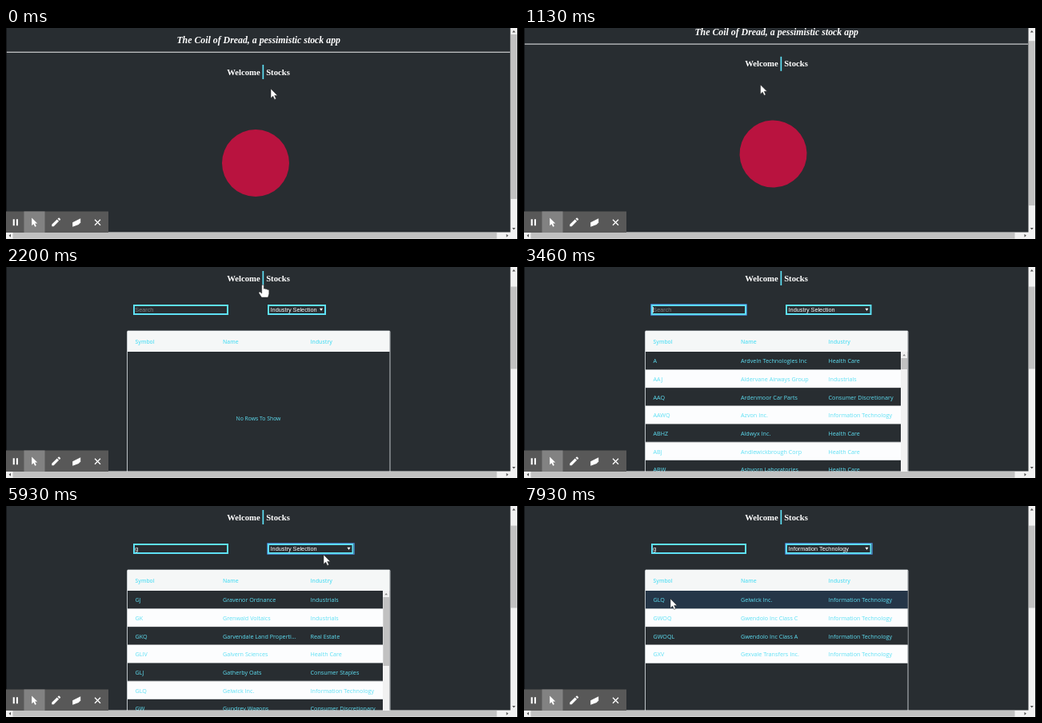
An HTML page for the animation above (8000 ms loop, 640 px wide and 264 px high).

```html
<!DOCTYPE html>
<html lang="en">
<head>
<meta charset="utf-8">
<title>Stock list</title>
<style>
html, body { margin: 0; width: 100%; height: 100%; overflow: hidden; background: #282d31; }
svg { display: block; width: 100vw; height: 100vh; }
text { white-space: pre; }
.serif { font-family: "Liberation Serif", serif; font-weight: bold; fill: #fff; text-anchor: middle; }
.sans { font-family: "Liberation Sans", sans-serif; font-size: 7.3px; fill: #fff; }
.cell { font-family: "Open Sans", sans-serif; font-size: 7.2px; fill: #5ee0f4; }
.head { font-size: 6.8px; font-weight: 600; }
</style>
</head>
<body>
<svg id="stage" viewBox="0 0 640 264" preserveAspectRatio="none"></svg>
<script>
const LOOP = 8000, CYAN = '#5ee0f4', DARK = '#282d31';
const TABLE_TOP = 121, ROW_TOP = 147, ROW_H = 22.65;
const COLUMNS = [161.5, 271, 380.5];
const stage = document.getElementById('stage');

function add(parent, tag, attrs = {}, text) {
  const el = document.createElementNS(stage.namespaceURI, tag);
  for (const key in attrs) el.setAttribute(key, attrs[key]);
  if (text !== undefined) el.textContent = text;
  return parent.appendChild(el);
}
const group = parent => add(parent, 'g');
const box = (parent, x, y, width, height, fill, more) =>
  add(parent, 'rect', { x, y, width, height, fill, ...more });
const path = (parent, d, fill, more) => add(parent, 'path', { d, fill, ...more });
const label = (parent, cls, x, y, text, more) =>
  add(parent, 'text', { class: cls, x, y, ...more }, text);
const show = (el, on) => { el.style.display = on ? '' : 'none'; };

// Linear reading of a table of [time, ...values]
function at(table, t) {
  let i = 1;
  while (i < table.length - 1 && table[i][0] < t) i++;
  const a = table[i - 1], b = table[i];
  const k = Math.min(1, Math.max(0, (t - a[0]) / (b[0] - a[0])));
  return a.slice(1).map((v, n) => v + (b[n + 1] - v) * k);
}

const SCROLL = [[0, 0], [1060, 0], [1130, 10], [1340, 41], [LOOP, 41]];
const POINTER = [
  [0, 331, 76], [200, 331, 76], [860, 300, 73], [1130, 295.5, 71], [1500, 300, 55],
  [1800, 321, 22], [2600, 321, 22], [2950, 250, 40], [3200, 215, 54], [4900, 215, 54],
  [5500, 397, 61], [6730, 397, 61], [6860, 372, 98], [7200, 372, 98],
  [7460, 191, 125], [7800, 183, 116], [LOOP, 183, 116]
];
const OPEN = 1950, LOADED = 2900, FOCUS = 3350, TYPED = 4460, PICK = 5600, PICKED = 6730;

const HEALTH = 'Health Care', INDUSTRY = 'Industrials', TECH = 'Information Technology';
const ALL = [
  ['A', 'Ardveln Technologies Inc', HEALTH],
  ['AAJ', 'Aldervane Airways Group', INDUSTRY],
  ['AAQ', 'Ardenmoor Car Parts', 'Consumer Discretionary'],
  ['AAWQ', 'Azvon Inc.', TECH],
  ['ABHZ', 'Aldwyx Inc.', HEALTH],
  ['ABJ', 'Andlewickbrough Corp', HEALTH],
  ['ABW', 'Ashvorn Laboratories', HEALTH]
];
const WITH_G = [
  ['GJ', 'Gravenor Ordnance', INDUSTRY],
  ['GK', 'Grenwald Voltaics', INDUSTRY],
  ['GKQ', 'Garvendale Land Properti...', 'Real Estate'],
  ['GLIV', 'Galvern Sciences', HEALTH],
  ['GLJ', 'Gatherby Oats', 'Consumer Staples'],
  ['GLQ', 'Gelwick Inc.', TECH],
  ['GW', 'Gundrey Wagons', 'Consumer Discretionary']
];
const TECH_G = [
  WITH_G[5],
  ['GWOQ', 'Gwendolo Inc Class C', TECH],
  ['GWOQL', 'Gwendolo Inc Class A', TECH],
  ['GXV', 'Gexvale Transfers Inc.', TECH]
];

box(stage, 0, 0, 640, 264, DARK);
const page = group(stage);

// Page heading
label(page, 'serif', 315.7, 19, 'The Coil of Dread, a pessimistic stock app',
  { 'font-size': 11.85, 'font-style': 'italic' });
box(page, 0, 29.7, 630, 1.1, '#dcdedf');
label(page, 'serif', 297, 58.6, 'Welcome', { 'font-size': 10.7 });
label(page, 'serif', 340, 58.6, 'Stocks', { 'font-size': 10.7 });
box(page, 320.5, 46, 1.7, 18, CYAN);

// Home view
const home = group(page);
add(home, 'circle', { cx: 312, cy: 169, r: 42, fill: '#b9133f' });

// Stock view
const stocks = group(page);
const field = (x, width) =>
  box(stocks, x, 89, width, 11, DARK, { stroke: CYAN, 'stroke-width': 2 });
const ring = (x, width) =>
  box(stocks, x, 87.7, width, 13.6, 'none', { stroke: '#4d90e8', 'stroke-width': 0.8 });
field(160, 117);
const searchRing = ring(158.7, 119.6);
const query = label(stocks, 'sans', 161.3, 97, 'Search');
const caret = box(stocks, 161.2, 91, 0.8, 7, '#fff');
const select = field(328, 71);
const selectRing = ring(326.7, 108.6);
const choice = label(stocks, 'sans', 330.6, 96.8, 'Industry Selection');
const arrow = path(stocks, 'M-2 -1.6H2L0 1.8Z', '#fff');

box(stocks, 151.5, TABLE_TOP, 328.5, 230, DARK,
  { stroke: '#bdc3c7', 'stroke-width': 1, rx: 1 });
box(stocks, 152, TABLE_TOP, 327.6, ROW_TOP - TABLE_TOP, '#f5f7f7');
['Symbol', 'Name', 'Industry'].forEach((name, i) =>
  label(stocks, 'cell head', COLUMNS[i], 136.6, name));
const empty = label(stocks, 'cell', 315.5, 233.4, 'No Rows To Show',
  { 'text-anchor': 'middle', style: 'font-size:6.8px' });

function makeRows(rows, width) {
  const list = group(stocks);
  list.bands = rows.map((row, i) => {
    const y = ROW_TOP + i * ROW_H;
    const band = box(list, 152, y, width, ROW_H, i % 2 ? '#fcfdfe' : DARK);
    box(list, 152, y + ROW_H - 0.5, width, 0.5, '#d9dcde');
    row.forEach((text, c) => label(list, 'cell', COLUMNS[c], y + 14.4, text));
    return band;
  });
  return list;
}
const lists = [makeRows(ALL, 319), makeRows(WITH_G, 319), makeRows(TECH_G, 327.6)];

const gridBar = group(stocks);
box(gridBar, 471, ROW_TOP, 8.5, 200, '#f1f1f1');
path(gridBar, 'M473.4 152.3h3.6l-1.8 -2.2z', '#888');
const gridThumb = box(gridBar, 471.4, 155, 7.6, 14, '#c1c1c1');

// Window scroll bars
box(stage, 630.5, 0, 8.5, 264, '#f1f1f1');
box(stage, 0, 255.5, 639, 8.5, '#f1f1f1');
box(stage, 8.5, 256, 605, 7.6, '#c1c1c1');
const thumb = box(stage, 631, 8, 7.6, 206, '#c1c1c1');
path(stage, 'M632.8 5.4h4l-2 -2.4zM632.8 250h4l-2 2.4zM6 257.7v4l-2.4 -2zM625.5 257.7v4l2.4 -2z', '#505050');
box(stage, 0, 0, 0.8, 256, '#101214');
box(stage, 639, 0, 1, 264, '#101214');

// Recorder tool bar
const tools = group(stage);
box(tools, 0, 229.5, 128, 26.5, '#585858');
box(tools, 22.5, 229.5, 26, 26.5, '#828282');
path(tools, 'M8.7 239.3h2.1v8h-2.1zM12.9 239.3h2.1v8h-2.1z', '#fff');
path(tools, 'M32.2 237.6v9.6l2.3 -2 1.7 3.6 1.7 -.8 -1.7 -3.5h3z', '#fff');
path(tools, 'M57.3 248.3v-2.5l6.4 -6.4 2.4 2.4 -6.4 6.5zM64.5 238.7l1 -1q.7 -.5 1.3 .1l1.1 1.1q.6 .6 0 1.2l-1 1z', '#fff');
path(tools, 'M83.2 243.2l10 -5v5.2l-2.5 2.6 -7.5 2.7z', '#fff');
path(tools, 'M111 239.8l7 7m0 -7l-7 7', 'none', { stroke: '#fff', 'stroke-width': 1.3 });

// Mouse pointer
const pointer = group(stage);
const edge = { stroke: '#222', 'stroke-width': 0.5, 'stroke-linejoin': 'round' };
const shaft = path(pointer, 'M0 0V11.7L2.7 9.2 4.7 13.4 6.6 12.5 4.7 8.4H8.3Z', '#fff', edge);
const hand = path(pointer, 'M-1.3 1Q0 -.8 1.3 1V5.3Q2.6 4.4 3.6 5.7 4.9 5 5.8 6.3 7.4 5.8 7.8 7.3V11.5L6.5 16H-1.5L-5 10.6Q-5.2 8.8 -3.3 9.2L-1.3 11Z', '#fff', edge);

function draw(t) {
  const [scroll] = at(SCROLL, t), [x, y] = at(POINTER, t);
  const opened = t >= OPEN, loaded = t >= LOADED, typed = t >= TYPED, picked = t >= PICKED;

  page.setAttribute('transform', `translate(0 ${-scroll})`);
  home.setAttribute('transform', `rotate(${t * 0.018} 315.5 167)`);
  show(home, !opened);
  show(stocks, opened);

  const height = opened ? 592 : 296;
  thumb.setAttribute('y', 8 + scroll * 239 / height);
  thumb.setAttribute('height', 255 * 239 / height);

  query.textContent = typed ? 'g' : 'Search';
  query.style.fill = typed ? '#fff' : '#7b7f82';
  show(searchRing, t >= FOCUS && t < PICK);
  show(caret, t >= FOCUS && t < PICK && (t - FOCUS) % 1000 < 500);
  caret.setAttribute('x', typed ? 165.6 : 161.2);
  show(selectRing, t >= PICK);
  select.setAttribute('width', loaded ? 105.5 : 71);
  arrow.setAttribute('transform', `translate(${loaded ? 428.5 : 394} 94.3)`);
  choice.textContent = picked ? TECH : 'Industry Selection';

  const active = !loaded ? -1 : picked ? 2 : typed ? 1 : 0;
  const hovered = Math.floor((y + scroll - ROW_TOP) / ROW_H);
  lists.forEach((list, n) => show(list, n === active));
  lists[2].bands[0].setAttribute('fill', hovered === 0 ? '#253648' : DARK);
  show(empty, !loaded);
  show(gridBar, loaded && !picked);
  gridThumb.setAttribute('height', typed ? 86 : 14);

  const overLink = x > 315 && y < 32;
  const overSearch = opened && x > 159 && x < 278 && y > 47 && y < 61;
  pointer.setAttribute('transform', `translate(${x} ${y})`);
  show(pointer, !overSearch);
  show(hand, overLink);
  show(shaft, !overLink);
}

const start = performance.now();
function tick() {
  draw((performance.now() - start) % LOOP);
  requestAnimationFrame(tick);
}
tick();
</script>
</body>
</html>
```
